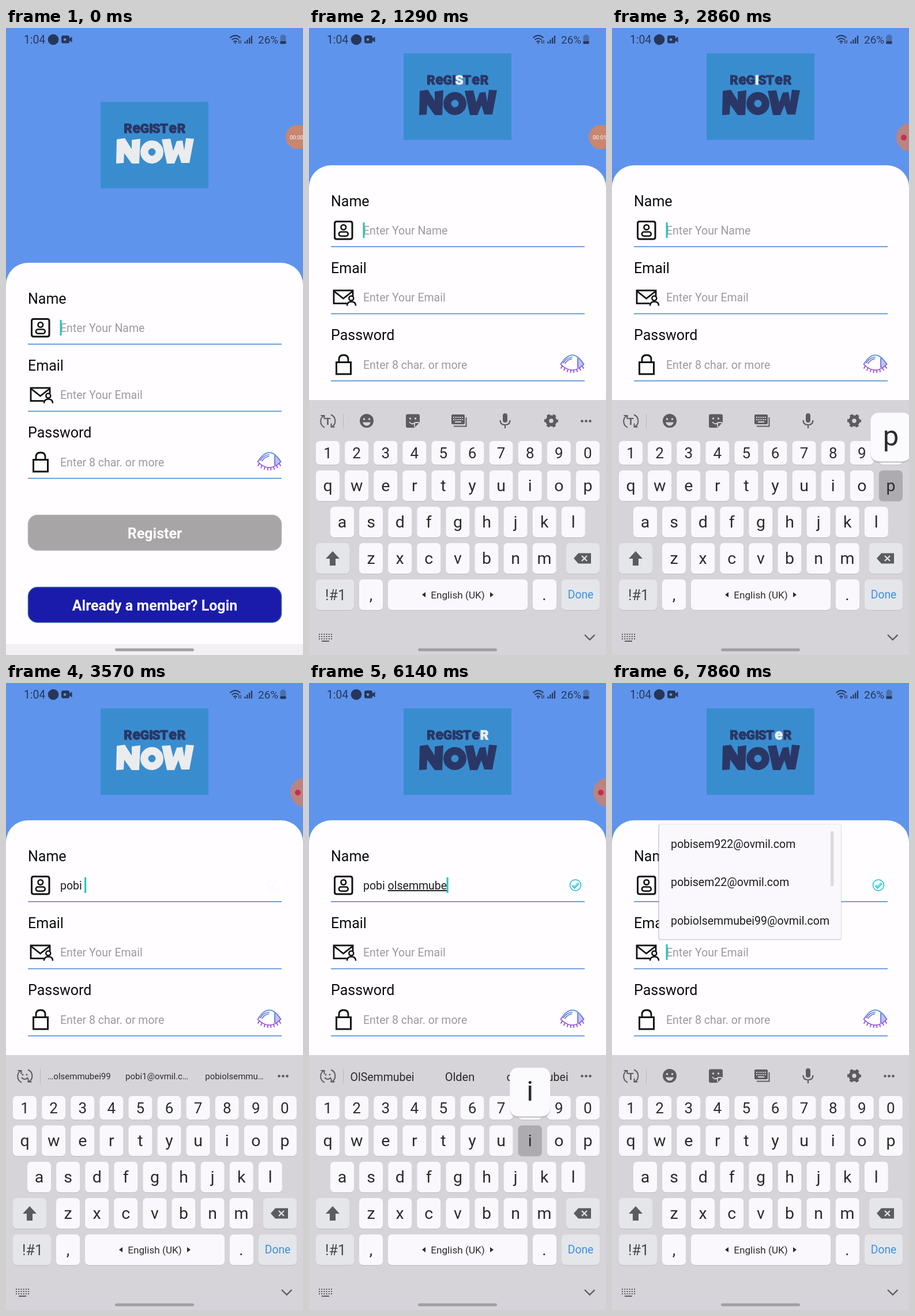
An HTML page for the animation above (8000 ms loop, 515x1087 px).

```html
<!DOCTYPE html>
<html lang="en">
<head>
<meta charset="utf-8">
<title>Register form</title>
<style>
html, body { margin: 0; height: 100%; overflow: hidden; background: #5f94ec; }
svg { display: block; width: 100%; height: 100%; font-family: Roboto, sans-serif; }
</style>
</head>
<body>
<svg id="stage" viewBox="0 0 515 1087"></svg>
<script>
const stage = document.getElementById('stage');
const measure = document.createElement('canvas').getContext('2d');
const STEPS = 56, LOOP = 8000;
const INK = '#2b2b2e', GREY = '#5c5b5f', STATUS = '#26375a', KEY = '#faf8fc', FIELD = 19.5;

// Schedule, in steps of 1/7 s
const LAYOUT_UP = 6, EMAIL_FOCUS = 47, DROPDOWN = 55;
const PRESSES = [[20, 'p'], [21, 'o'], [22, 'b'], [23, 'i'], [24, ' '], [30, 'o'], [31, 'l'], [32, 's'],
  [34, 'e'], [35, 'm'], [36, 'm'], [39, 'u'], [41, 'b'], [42, 'e'], [43, 'i']];
const SWEEPS = [-10, 6, 18, 37, 50];
const SUGGESTIONS = [
  [24, 15, ['…olsemmubei99', 'pobi1@ovmil.c…', 'pobiolsemmu…']],
  [31, 20, ['also', 'Old', 'OlSemmubei']],
  [40, 20, ['OlSemmubei', 'Olden', 'olsemmubei']]];

const rect = (x, y, w, h, fill, r = 0, more = '') =>
  `<rect x="${x}" y="${y}" width="${w}" height="${h}" rx="${r}" fill="${fill}" ${more}/>`;
const circle = (x, y, r, fill, more = '') => `<circle cx="${x}" cy="${y}" r="${r}" fill="${fill}" ${more}/>`;
const line = (d, color, width = 2, more = '') =>
  `<path d="${d}" fill="none" stroke="${color}" stroke-width="${width}" ${more}/>`;
const shape = (d, fill) => `<path d="${d}" fill="${fill}"/>`;
const text = (x, y, size, str, fill = INK, more = '') =>
  `<text x="${x}" y="${y}" font-size="${size}" fill="${fill}" ${more}>${str}</text>`;
const MID = 'text-anchor="middle"';
const group = (y, body, x = 0) => `<g transform="translate(${x} ${y})">${body}</g>`;

function statusBar() {
  return text(31, 27, 19.3, '1:04', STATUS) + circle(82, 20, 9.3, STATUS) +
    rect(96, 13, 14, 13.5, STATUS, 3) + shape('M109 19l5.5-4v10l-5.5-4z', STATUS) + circle(102, 20, 2.3, '#5f94ec') +
    line('M388.5 17q9-8 18 0M391.5 20.5q6-5 12 0M394.5 24q3-2.5 6 0', STATUS, 1.8) +
    circle(397.5, 26, 1.3, STATUS) + line('M404 21v6M407 27v-6', STATUS, 1.3) +
    [0, 1, 2, 3].map(i => rect(413.5 + i * 3.8, 23.5 - i * 3.4, 2.2, 3.5 + i * 3.4, STATUS)).join('') +
    text(437, 27, 19, '26%', STATUS) + rect(478, 11.5, 5, 2, '#4b6fae') +
    rect(475.5, 13, 10, 14.5, '#4b6fae', 1.5) + rect(475.5, 23, 10, 4.5, STATUS, 1);
}

// Letters light up one by one, then the big word blinks
function logo(n) {
  const lit = n - SWEEPS.filter(s => s <= n).pop() + 1;
  const color = on => on ? '#ebecee' : '#2a3766';
  const centers = [211.5, 226, 240.5, 251.3, 260.5, 274, 289, 304];
  const small = [...'ReGISTeR'].map((c, i) => {
    const fill = color(i === lit);
    return text(centers[i], 98, c === 'e' ? 25 : 22.5, c, fill,
      `${MID} font-weight="900" stroke="${fill}" stroke-width="1"`);
  }).join('');
  const big = color(lit > 7 && Math.floor((lit - 7) / 2) % 2 === 0);
  return rect(164, 44, 187, 150, '#398dcf') + small +
    shape('M192 109L206 107 218 126V110L233 108 231 151 218 151 205 133 204 150 191 151Z', big) +
    circle(253, 131, 13.2, 'none', `stroke="${big}" stroke-width="13.5"`) +
    shape('M270 109L285 108 290 129 296 112 306 111 309 128 312 107 326 108 318 150 304 150 299 134 292 151 279 151Z', big);
}

function eye() {
  const lashes = [-17, -12.5, -7.5, -2.5, 2.5, 7.5, 12.5, 17].map(x => {
    const y = 593 - x * x * 0.026;
    return `M${456.5 + x} ${y}l${x * 0.17} 5`;
  }).join('');
  return '<linearGradient id="iris" x2="0" y2="1"><stop stop-color="#3f8be0"/><stop offset="1" stop-color="#9a45dc"/></linearGradient>' +
    shape('M466 571q8 4 10 12q-4 5-10 8z', '#b9c4f6') +
    line('M436.5 583Q456.5 551 476.5 583Q456.5 603 436.5 583ZM440.5 581Q447 571 457 570.5M443.5 582Q449 574 456 573.5M466 572V589', 'url(#iris)', 1.7) +
    line(lashes, '#9250e0', 1.8);
}

const nameIcon = line('M48 335.5H71.5Q75 335.5 75 339V362.5Q75 366 71.5 366H48Q44.500 366 44.500 362.5V339Q44.500 335.5 48 335.500Z', '#111', 3) +
  circle(59.8, 345.500, 4.300, 'none', 'stroke="#111" stroke-width="2.600"') +
  rect(51.800, 353.500, 16, 7.200, 'none', 3.600, 'stroke="#111" stroke-width="2.600"');
const mailIcon = rect(43, 455, 33, 22.5, 'none', 0, 'stroke="#111" stroke-width="2.800"') +
  line('M43 456L59.500 469 76 456', '#111', 2.800) + circle(73.500, 473, 9, '#fffdff') +
  circle(73.300, 468.500, 4, 'none', 'stroke="#111" stroke-width="2.500"') +
  line('M66 481.500Q66 474.500 73.500 474.500T81 481.500', '#111', 2.500);
const lockIcon = rect(47.500, 579.500, 25, 20.500, 'none', 0, 'stroke="#111" stroke-width="3"') +
  line('M52 579V574.500Q52 567 60 567T68 574.500V579', '#111', 2.800);

function form(n) {
  const presses = PRESSES.filter(([s]) => s < n);
  const name = presses.map(([, c]) => c).join('');
  const email = n >= EMAIL_FOCUS;
  const field = (i, label, hint, value) => {
    const y = i * 116.3;
    const marked = email ? value : value.replace(/\S+$/, '<tspan text-decoration="underline">$&</tspan>');
    return text(38, 308.5 + y, 25, label, '#0c0c0e') + text(94, 358 + y, FIELD, marked || hint, value ? '#1c1c1e' : '#9c9a9d') +
      rect(38, 378.3 + y, 440, 1.6, '#4a8cd8');
  };
  const press = PRESSES.filter(([s]) => s <= n).pop();
  const since = email ? EMAIL_FOCUS : press ? press[0] : 0;
  measure.font = `${FIELD}px Roboto, sans-serif`;
  const cursorX = 94 + (email ? 0 : measure.measureText(name).width);
  const cursor = (n - since) % 7 < 4 ? rect(cursorX - 0.5, email ? 453 : 337, 3, 27, '#25c5b8') : '';
  const check = Math.min(1, Math.max(0, (n - 24.9) / 3));
  return field(0, 'Name', 'Enter Your Name', name) + field(1, 'Email', 'Enter Your Email', '') +
    field(2, 'Password', 'Enter 8 char. or more', '') + nameIcon + mailIcon + lockIcon + eye() + cursor +
    `<g opacity="${check}">` + circle(462, 350.5, 9.5, 'none', 'stroke="#18c3d2" stroke-width="1.5"') +
    line('M457 351l3.500 3.500 7-7.500', '#18c3d2', 3.4) + line('M457.500 351l3 3 6.500-7', '#fff', 1) + '</g>';
}

function button(y, label, fill, stroke) {
  return rect(38.5, y, 439, 61, fill, 16, `stroke="${stroke}" stroke-width="1.5"`) +
    text(258, y + 40.5, 25, label, '#fff', `${MID} font-weight="700"`);
}

function bubble(n) {
  const leave = Math.max(0, n - 46) * 7;
  if (leave > 28) return '';
  if (n >= 19) return group(0, circle(518, 189.5, 25, '#bb8480') + circle(506, 190, 5, '#c22f55'), leave);
  const slide = Math.max(0, n - 16) * 4;
  return group(0, circle(506, 189, 21, '#c98670') +
    text(492, 193, 9.5, n < 8 ? '00:00' : '00:01', '#fff'), slide);
}

function toolbar(n) {
  const typing = n >= 24 && n < EMAIL_FOCUS;
  let s = line('M27 692.500A11.500 11.500 0 0 1 26 672M38 670.500A11.500 11.500 0 0 1 39 691.500', GREY, 2) +
    line('M20.500 672H26.500V678M44.500 691.500H38.500V685.500', GREY, 2) + rect(59, 669, 1, 25, '#b9b7bb') +
    [473.5, 480.5, 487.5].map(x => circle(x, 681.5, 2.3, GREY)).join('');
  if (typing) {
    const [, size, words] = SUGGESTIONS.filter(([s]) => s <= n).pop();
    return s + circle(29, 679, 1.5, GREY) + circle(36, 679, 1.5, GREY) + line('M27 684q5.500 6 11 0', GREY, 2) +
      words.map((w, i) => text(127 + i * 134.5, size > 15 ? 690 : 687, w.length > 8 && size > 15 ? 19.5 : size, w, INK, MID)).join('');
  }
  s += text(32.5, 688, 17, 'T', GREY, `${MID} font-weight="700"`);
  s += circle(100, 681, 12, GREY) + circle(95.5, 678, 1.8, '#d6d4d8') + circle(104.5, 678, 1.8, '#d6d4d8') +
    shape('M93 683.500h14q-2 6-7 6t-7-6z', '#d6d4d8');
  s += shape('M171 669.500h18q3 0 3 3v11l-9 9.500h-12q-3 0-3-3v-17.500q0-3 3-3z', GREY) +
    circle(175.5, 677, 1.7, '#d6d4d8') + circle(184.500, 677, 1.7, '#d6d4d8') +
    line('M174 683q5 6 10 1M183 692v-6q0-2 2-2h6', '#d6d4d8', 1.8);
  s += rect(247, 670, 23, 17, GREY, 2) + line('M251 690.500H272.500V675', GREY, 2) +
    line('M250 675H267M250 679H267', '#d6d4d8', 2, 'stroke-dasharray="2 1.700"') + rect(253, 682, 11, 2, '#d6d4d8');
  s += rect(336, 668, 8, 16, GREY, 4) + line('M331.500 680q0 8 8.500 8t8.500-8M340 688v6', GREY, 2.2);
  return s + circle(420, 681, 6.7, 'none', `stroke="${GREY}" stroke-width="6"`) +
    circle(420, 681, 10, 'none', `stroke="${GREY}" stroke-width="4" stroke-dasharray="5.240" stroke-dashoffset="2.600"`);
}

const ROWS = [['1234567890', 12, 716, 41, 26], ['qwertyuiop', 12, 767, 53, 28.5],
  ['asdfghjkl', 37, 830, 53, 28.5], ['zxcvbnm', 87, 893, 53, 28.5]];

function keyboard(n) {
  const [, pressed] = PRESSES.find(([s]) => s === n) || [];
  const key = (x, y, w, h, fill = KEY) => rect(x, y + 1, w, h, '#bfbdc2', 6.5) + rect(x, y, w, h, fill, 6.5);
  const special = '#e5e6ea', down = '#adabaf';
  let popup = '';
  const letters = ROWS.map(([chars, left, y, h, size]) => [...chars].map((c, i) => {
    const x = left + i * 50.1, mid = x + 20.5, isDown = c === pressed;
    if (isDown) popup = rect(mid - 35, y - 98, 70, 85, '#b7b5ba', 14, 'opacity=".6"') +
      rect(mid - 35, y - 100, 70, 84, '#fbfafc', 14) + text(mid, y - 43, 49, c, INK, MID);
    return key(x, y, 41, h, isDown ? down : KEY) + text(mid, y + h / 2 + size * 0.35, size, c, INK, MID);
  }).join('')).join('');
  return rect(0, 645, 515, 442, '#d6d4d8') + toolbar(n) + letters +
    key(12, 893, 58, 53, special) + shape('M41 907L53 920H46V932H36V920H29Z', GREY) +
    key(446, 893, 58, 53, special) + shape('M459 919.500L467 910.500H489V928.500H467Z', GREY) +
    line('M473 915l9 9M482 915l-9 9', special, 2.2) +
    key(12, 956, 66, 53, special) + text(46, 991.5, 25, '!#1', '#48474b', MID) +
    key(87, 956, 41, 53) + text(107.5, 992, 28, ',', INK, MID) +
    key(137, 956, 242, 53, pressed === ' ' ? down : KEY) + text(258, 988.5, 17.2, 'English (UK)', INK, MID) +
    shape('M202 978v9l-6-4.500zM314 978v9l6-4.500z', INK) +
    key(388, 956, 41, 53) + text(408, 992, 28, '.', INK, MID) +
    key(438, 956, 66, 53, special) + text(471, 989, 19.3, 'Done', '#3c90e4', MID) + popup;
}

function bottomBar(n) {
  const icons = [1051, 1055, 1059].map(y => line(`M17 ${y}H40`, GREY, 2, 'stroke-dasharray="2 2.200"')).join('') +
    line('M22 1063H35', GREY, 2) + line('M478 1052L486.800 1060.500 495.500 1052', GREY, 2.4);
  return (n >= 3 ? icons : '') + rect(189, 1075.5, 137, 5, '#a19fa2', 2.5);
}

function dropdown() {
  return rect(80, 245, 318, 201, '#8a888c', 4, 'opacity=".25"') + rect(80.5, 244, 317, 201, '#c9c7cb', 4, 'opacity=".5"') +
    rect(82, 245, 315, 199, KEY, 3) + rect(379, 257, 5.5, 95, '#dcdadd', 1) +
    ['pobisem922@ovmil.com', 'pobisem22@ovmil.com', 'pobiolsemmubei99@ovmil.com']
      .map((mail, i) => text(102, 285.5 + i * 66.5, FIELD, mail, '#1c1c1e')).join('');
}

function draw(n) {
  const up = n >= LAYOUT_UP;
  const rise = { 7: 210, 8: 40 }[n] || 0;
  stage.innerHTML = rect(0, 0, 515, 1087, '#5f94ec') + statusBar() + group(up ? 0 : 84, logo(n)) +
    group(up ? 0 : 169, rect(0, 238, 515, 900, '#fffdff', 38) + form(n)) +
    rect(0, 1068, 515, 19, '#f2f0f2') +
    (up ? '' : button(844.5, 'Register', '#a7a5a6', '#b3b1b3') + button(969.5, 'Already a member? Login', '#1b1bab', '#2f62a0')) +
    bubble(n) + (n > LAYOUT_UP ? group(rise, keyboard(n)) + (rise ? rect(0, 1068, 515, 19, '#d6d4d8') : '') : '') +
    bottomBar(n) + (n >= DROPDOWN ? dropdown() : '');
}

let shown = -1;
const start = performance.now();
function tick() {
  const step = Math.floor((performance.now() - start + 5) % LOOP / LOOP * STEPS);
  if (step !== shown) draw(shown = step);
  requestAnimationFrame(tick);
}
tick();
</script>
</body>
</html>
```
